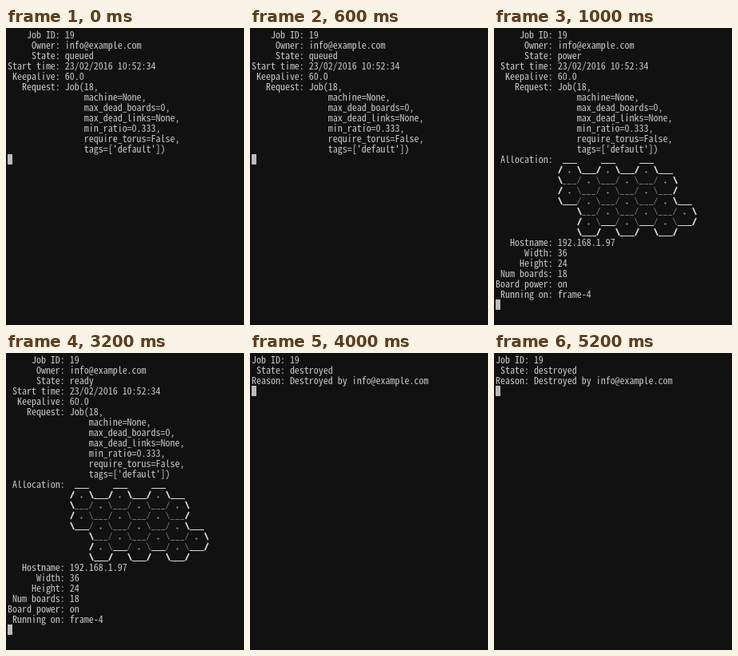
Recreate the animation shown at these times as an HTML page. Size 298x372 px, loop 6 s.

```html
<!DOCTYPE html>
<html lang="en">
<head>
<meta charset="utf-8">
<title>Job status</title>
<style>
  html, body { margin: 0; width: 100%; height: 100%; overflow: hidden; background: #111; }
  svg { display: block; fill: none; }
  text {
    fill: #c8c8c8; white-space: pre;
    font: 12px "Noto Sans Mono CJK JP", "Noto Sans CJK JP", "Noto Sans CJK", "DejaVu Sans Mono", monospace;
    font-feature-settings: "hwid"; font-kerning: none; font-variant-ligatures: none;
  }
  .inner { stroke: #707070; }
  .outer { stroke: #d8d8d8; }
</style>
</head>
<body>
<svg width="298" height="372">
  <g id="screen"></g>
  <g id="map"></g>
  <rect id="cursor" x="2" width="6" height="13" fill="#bababa"/>
</svg>
<script>
const CELL = 6, LINE = 13, PAD = 2, LOOP = 6000;
const owner = 'info@example.com';
const $ = id => document.getElementById(id);
const baseline = row => PAD + row * LINE + 11;

// Right-align labels; entries without a label continue the value column.
function table(width, rows) {
  return rows.map(([label, value]) =>
    (label ? label + ':' : '').padStart(width) + ' ' + value);
}

const job = state => [
  ['Job ID', '19'],
  ['Owner', owner],
  ['State', state],
  ['Start time', '23/02/2016 10:52:34'],
  ['Keepalive', '60.0'],
  ['Request', 'Job(18,'],
  ...['machine=None,', 'max_dead_boards=0,', 'max_dead_links=None,',
    'min_ratio=0.333,', 'require_torus=False,', "tags=['default'])"]
    .map(arg => ['', '    ' + arg])
];

const allocated = state => table(12, [
  ...job(state),
  ['Allocation', ''],
  ...Array(7).fill(['', '']),
  ['Hostname', '192.168.1.97'],
  ['Width', '36'],
  ['Height', '24'],
  ['Num boards', '18'],
  ['Board power', 'on'],
  ['Running on', 'frame-4']
]);

const scenes = [
  { from: 0, lines: table(11, job('queued')) },
  { from: 1000, lines: allocated('power'), map: true },
  { from: 2000, lines: allocated('ready'), map: true },
  { from: 4000, lines: table(7, [
    ['Job ID', '19'], ['State', 'destroyed'], ['Reason', 'Destroyed by ' + owner]]) }
];

// Hexagonal boards: first row and number of boards in each column.
function drawMap() {
  const edges = {};
  let dots = '';
  const edge = (kind, col, row) => {
    const key = [kind, col, row];
    edges[key] = (edges[key] || 0) + 1;
  };
  const columns = [[13, 2], [14, 3], [13, 3], [14, 3], [13, 3], [14, 3], [17, 1]];
  columns.forEach(([first, count], i) => {
    const col = 15 + 4 * i;
    for (let row = first; row < first + 2 * count; row += 2) {
      edge('_', col - 1, row - 1);
      edge('/', col - 2, row);
      edge('\\', col + 2, row);
      edge('\\', col - 2, row + 1);
      edge('_', col - 1, row + 1);
      edge('/', col + 2, row + 1);
      const x = PAD + col * CELL + 2.5, y = baseline(row) - 1.5;
      dots += `M${x - 1.5} ${y}h3M${x} ${y - 1.5}v3`;
    }
  });

  // Edges shared by two boards are dim, the outline is bright and bold.
  let svg = `<path class="inner" d="${dots}"/>`;
  for (const key in edges) {
    const [kind, col, row] = key.split(',');
    const inner = edges[key] > 1, flat = kind === '_';
    const x = PAD + col * CELL, slant = x + (inner ? .5 : 1), base = baseline(row);
    const d = flat ? `M${x} ${base + .5}h18`
      : kind === '/' ? `M${slant} ${base}l4 -9` : `M${slant} ${base - 9}l4 9`;
    svg += `<path class="${inner ? 'inner' : 'outer'}" d="${d}"` +
      ` stroke-width="${inner || flat ? 1 : 1.8}"` +
      (inner && flat ? ' stroke-dasharray="5 1"' : '') + '/>';
  }
  $('map').innerHTML = svg;
}

// Space the letters so that each one advances by a terminal cell.
function fitCells() {
  $('screen').innerHTML = '<text>0</text>';
  const width = $('screen').firstChild.getComputedTextLength();
  $('screen').style.letterSpacing = CELL - width + 'px';
}

let shown;
function frame(now) {
  const t = now % LOOP;
  const scene = scenes.findLast(s => s.from <= t);
  if (scene !== shown) {
    shown = scene;
    $('screen').innerHTML = scene.lines.map((line, row) =>
      `<text x="${PAD}" y="${baseline(row)}">${line}</text>`).join('');
    $('map').style.display = scene.map ? '' : 'none';
    $('cursor').setAttribute('y', PAD + LINE * scene.lines.length);
  }
  requestAnimationFrame(t => frame(Math.max(0, t - start)));
}

drawMap();
fitCells();
const start = performance.now();
frame(0);
</script>
</body>
</html>
```
